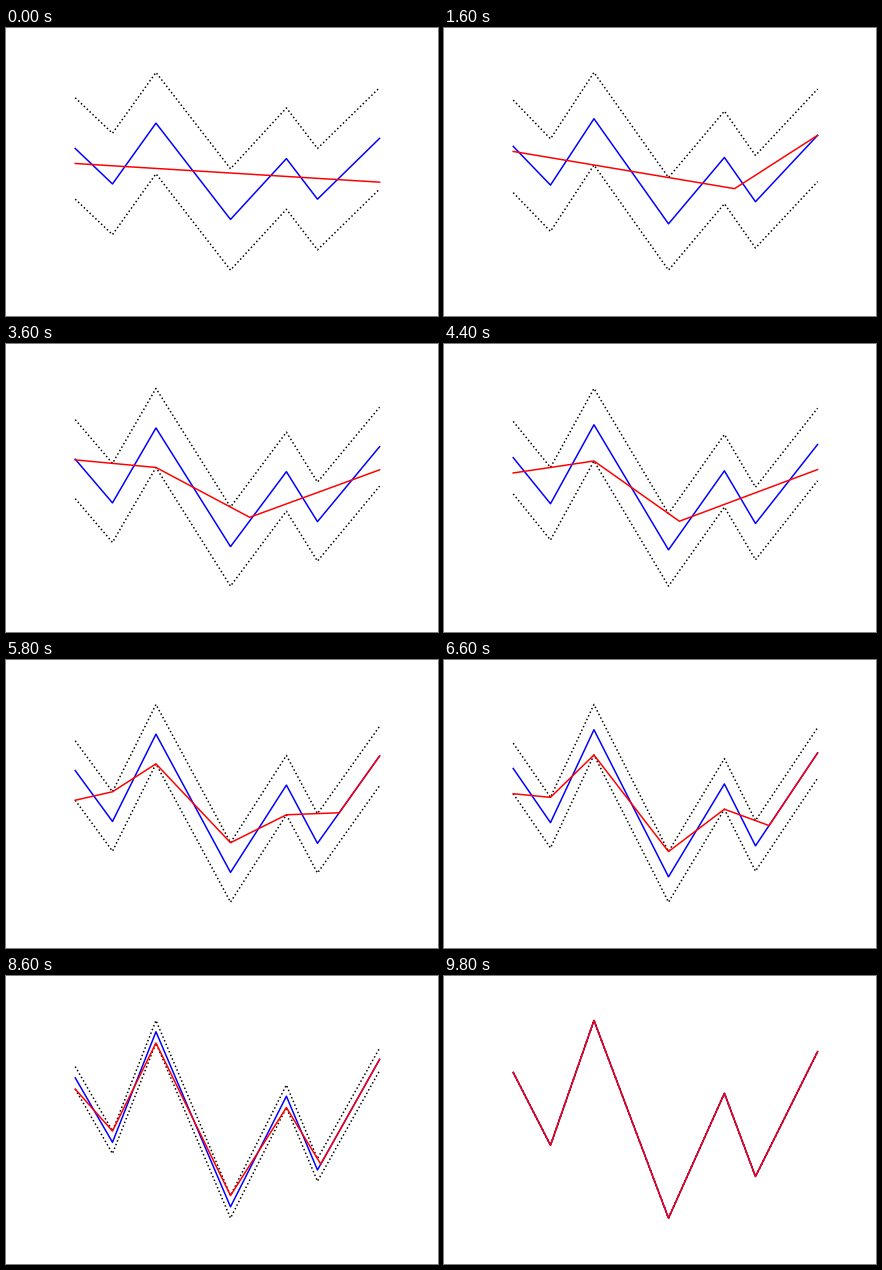
These frames come from a looping animation (432 px wide and 288 px high, 10 s). A matplotlib script:

```python
import numpy as np
import matplotlib.pyplot as plt
from matplotlib.animation import FuncAnimation

FRAMES, INTERVAL = 50, 200
X = np.array([0, 6, 13, 25, 34, 39, 49], float)
Y = np.array([14, 7, 19, 0, 12, 4, 16], float)
# which wall of the tube a taut path bends around at each inner vertex
SIDE = np.array([-1, 1, -1, 1, -1, 1])
GRID = np.linspace(X[0], X[-1], 9801)
CURVE = np.interp(GRID, X, Y)
TOL = 1e-9


def slope_range(px, py, eps):
    """Slopes of rays from a point that stay in the tube up to its right end."""
    ahead = X > px + 1e-6
    run = X[ahead] - px
    lo = ((Y[ahead] - eps - py) / run).max()
    hi = ((Y[ahead] + eps - py) / run).min()
    return lo, hi


def finish(a, b, eps):
    """Last link of the path, leaving from the window a-b, or None."""
    def at(t):
        return a[0] + (b[0] - a[0]) * t, a[1] + (b[1] - a[1]) * t

    def is_open(t):
        lo, hi = slope_range(*at(t), eps)
        return lo <= hi + TOL

    seen = [t for t in np.linspace(0, 1, 801) if is_open(t)]
    if not seen:
        return None
    px, py = at((seen[0] + seen[-1]) / 2)
    run = X[-1] - px
    lo, hi = (py + s * run for s in slope_range(px, py, eps))
    end = Y[-1] if lo <= Y[-1] <= hi else lo + 0.45 * (hi - lo)
    return [(px, py), (X[-1], end)]


def fewest_links(eps):
    """Path with the fewest links inside the tube of half-width eps."""
    if eps < TOL:
        return list(zip(X, Y))
    path = finish((X[0], Y[0] - eps), (X[0], Y[0] + eps), eps)
    if path:
        return path

    bend = Y[:-1] + SIDE * eps

    def line(k, x):
        slope = (bend[k + 1] - bend[k]) / (X[k + 1] - X[k])
        return bend[k] + slope * (x - X[k])

    def fits(k):
        return np.all(np.abs(line(k, X[:k + 2]) - Y[:k + 2]) <= eps + TOL)

    first = max(k for k in range(5) if fits(k))
    path = [(X[0], line(first, X[0]))]
    for k in range(first, 5):
        corner = (X[k + 1], bend[k + 1])
        out = (GRID > X[k + 1] + 1e-6) & (np.abs(line(k, GRID) - CURVE) > eps + TOL)
        leave = GRID[out][0] if out.any() else X[-1]
        tail = finish(corner, (leave, line(k, leave)), eps)
        if tail:
            return path + tail
        path.append(corner)
    return path + [(X[-1], Y[-1])]


fig, ax = plt.subplots(figsize=(6, 4), dpi=72, facecolor="white")
fig.subplots_adjust(left=0.125, right=0.9, bottom=0.125, top=0.88)
ax.axis("off")
pad = 0.05 * (X[-1] - X[0])
ax.set_xlim(X[0] - pad, X[-1] + pad)
upper, = ax.plot(X, Y, "k:", lw=1.5)
lower, = ax.plot(X, Y, "k:", lw=1.5)
curve, = ax.plot(X, Y, "b-", lw=1.5)
fit, = ax.plot([], [], "r-", lw=1.5)


def draw(i):
    eps = 10 * (1 - i / (FRAMES - 1))
    upper.set_ydata(Y + eps)
    lower.set_ydata(Y - eps)
    fit.set_data(*zip(*fewest_links(eps)))
    low, high = Y.min() - eps, Y.max() + eps
    margin = 0.05 * (high - low)
    ax.set_ylim(low - margin, high + margin)
    return upper, lower, curve, fit


anim = FuncAnimation(fig, draw, frames=FRAMES, init_func=lambda: draw(0),
                     interval=INTERVAL, repeat=True, repeat_delay=0, blit=False)
plt.show()
```
